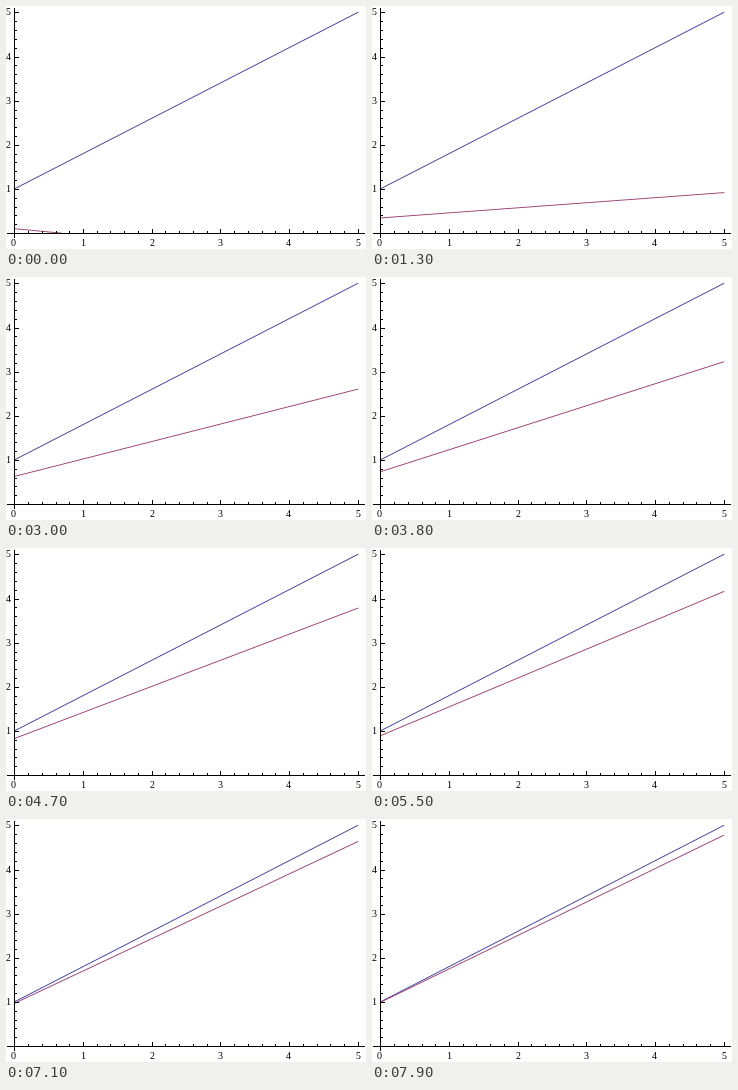
These frames come from a looping animation (360 px wide and 243 px high, 8 s). A matplotlib script:

```python
import numpy as np
import matplotlib.pyplot as plt
from matplotlib.animation import FuncAnimation

W, H, DPI = 360, 243, 72          # at 72 dpi one point is one pixel
FRAMES, INTERVAL = 80, 100
X0, Y0 = 8.3, 227.1               # pixel position of the plot's zero point
DX, DY = 68.7, 44.14              # pixels per unit
BLUE, PURPLE = "#3d3d99", "#993d71"
LINE = dict(lw=0.9, solid_capstyle="projecting")

# Height of the fitted line at x = 0 and x = 5, eased by smooth polynomials
KEYS = np.array([0, 9, 18, 27, 36, 45, 54, 63, 72, 79]) / 79
LEFT = [0.10, 0.27, 0.43, 0.585, 0.705, 0.81, 0.884, 0.935, 0.972, 0.99]
RIGHT = [-0.63, 0.446, 1.464, 2.353, 3.077, 3.665, 4.118, 4.434, 4.66, 4.774]
left_fit = np.polyfit(KEYS, LEFT, 4)
right_fit = np.polyfit(KEYS, RIGHT, 4)


def px(x):
    return X0 + DX * np.asarray(x)


def py(y):
    return Y0 - DY * np.asarray(y)


plt.rcParams["font.family"] = "Liberation Serif"
fig = plt.figure(figsize=(W / DPI, H / DPI), dpi=DPI, facecolor="white")
ax = fig.add_axes([0, 0, 1, 1])
ax.set(xlim=(0, W), ylim=(H, 0))
ax.axis("off")


def hline(row, left, right):
    ax.plot([left, right], [row + 0.5] * 2, color="black", lw=1, snap=False,
            solid_capstyle="butt", zorder=3)


def vline(col, top, bottom):
    ax.plot([col + 0.5] * 2, [top, bottom], color="black", lw=1, snap=False,
            solid_capstyle="butt", zorder=3)


def draw_axes():
    cols = np.round(px(np.arange(26) / 5))
    rows = np.round(py(np.arange(26) / 5))
    hline(rows[0], 1, 359)
    vline(cols[0], 2, 232)
    for i, (col, row) in enumerate(zip(cols, rows)):
        major = i % 5 == 0
        size = 4 if major else 2
        vline(col, rows[0] - size, rows[0])
        hline(row, cols[0] + 1, cols[0] + 1 + size)
        if major:
            label = str(i // 5)
            ax.text(col - 0.4, 240, label, size=10, ha="center", va="baseline")
            if i:
                ax.text(4.6, row + 3, label, size=10, ha="right", va="baseline")


draw_axes()
ax.plot(px([0, 5]), py([1, 5]), color=BLUE, **LINE)
fit, = ax.plot([], [], color=PURPLE, **LINE)


def update(i):
    t = i / (FRAMES - 1)
    a, b = np.polyval(left_fit, t), np.polyval(right_fit, t)
    end = 5 * a / (a - b) if b < 0 else 5      # stop at the x axis
    fit.set_data(px([0, end]), py([a, max(b, 0)]))
    return fit,


anim = FuncAnimation(fig, update, frames=FRAMES, interval=INTERVAL,
                     repeat=True, repeat_delay=0, blit=False)
plt.show()
```
